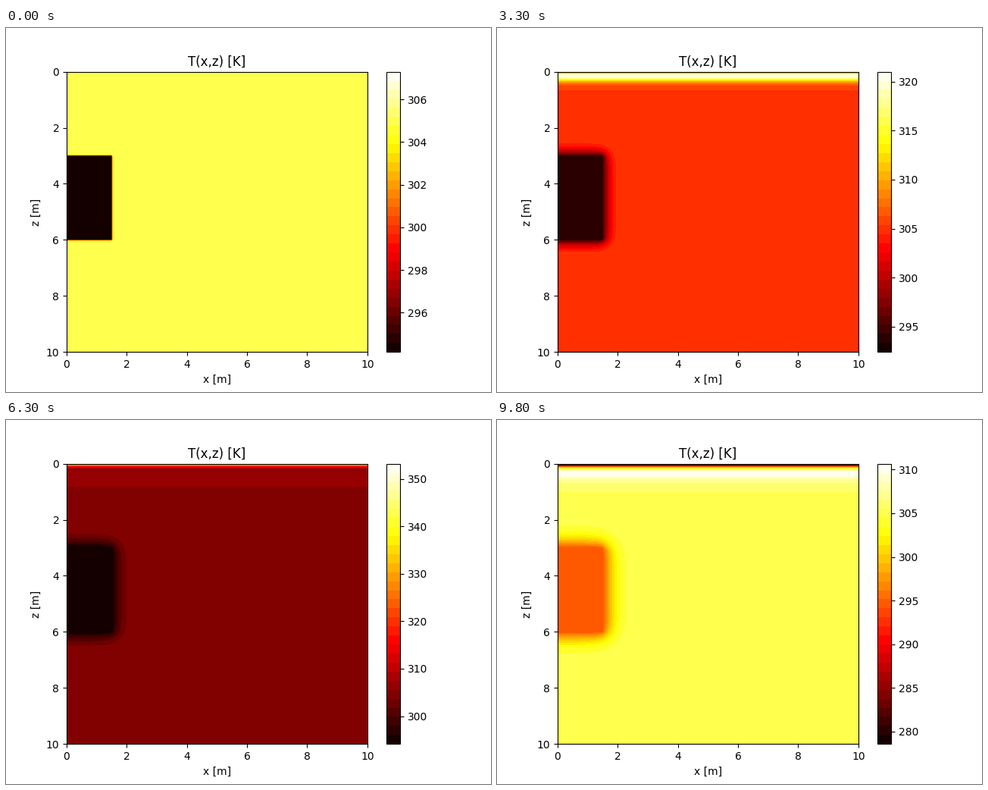
A matplotlib script that plays this animation: 640 by 480 pixels, repeating every 9.9 s.

```python
import numpy as np
import matplotlib.pyplot as plt
from matplotlib.animation import FuncAnimation
from matplotlib.ticker import AutoLocator

FRAMES = 99
INTERVAL = 100          # ms
SIZE = 10.0             # m
NODES = 201
DIFFUSIVITY = 9e-4      # m^2 per frame
SUBSTEPS = 4
T_SOIL = 305.15
T_BOX = 294.15
LEVELS = 32

x = np.linspace(0, SIZE, NODES)
z = np.linspace(0, SIZE, NODES)
X, Z = np.meshgrid(x, z)
eps = 1e-6
box = (X <= 1.5 + eps) & (Z >= 3 - eps) & (Z <= 6 + eps)


def surface(t):
    """Daily cycle at the ground surface plus the start-up transient."""
    a = np.radians(7.15 * t - 29.7)
    cycle = 313.6 + 45.7 * np.sin(a) - 1.2 * np.cos(a) ** 2
    return cycle + 17.25 * np.exp(-t / 4)


def apply_bounds(T, t):
    T[0] = surface(t)
    T[box] = T_BOX


def step(T, r):
    P = np.pad(T, 1, mode="edge")
    lap = P[2:, 1:-1] + P[:-2, 1:-1] + P[1:-1, 2:] + P[1:-1, :-2] - 4 * T
    return T + r * lap


def simulate():
    r = DIFFUSIVITY / SUBSTEPS / (x[1] - x[0]) ** 2
    T = np.full(X.shape, T_SOIL)
    apply_bounds(T, 0)
    fields = [T.copy()]
    for n in range(FRAMES - 1):
        for k in range(1, SUBSTEPS + 1):
            T = step(T, r)
            apply_bounds(T, n + k / SUBSTEPS)
        fields.append(T.copy())
    return fields


fields = simulate()
fig = plt.figure(figsize=(6.4, 4.8), dpi=100)


def draw(n):
    fig.clear()
    ax = fig.add_subplot()
    T = fields[n]
    levels = np.linspace(T.min(), T.max(), LEVELS)
    filled = ax.contourf(X, Z, T, levels=levels, cmap="hot")
    fig.colorbar(filled, ax=ax, ticks=AutoLocator())
    ax.set_xlim(0, SIZE)
    ax.set_ylim(SIZE, 0)
    ax.set_xlabel("x [m]")
    ax.set_ylabel("z [m]")
    ax.set_title("T(x,z) [K]")
    return []


anim = FuncAnimation(fig, draw, frames=FRAMES, interval=INTERVAL,
                     init_func=lambda: [], repeat=True)
plt.show()
```
